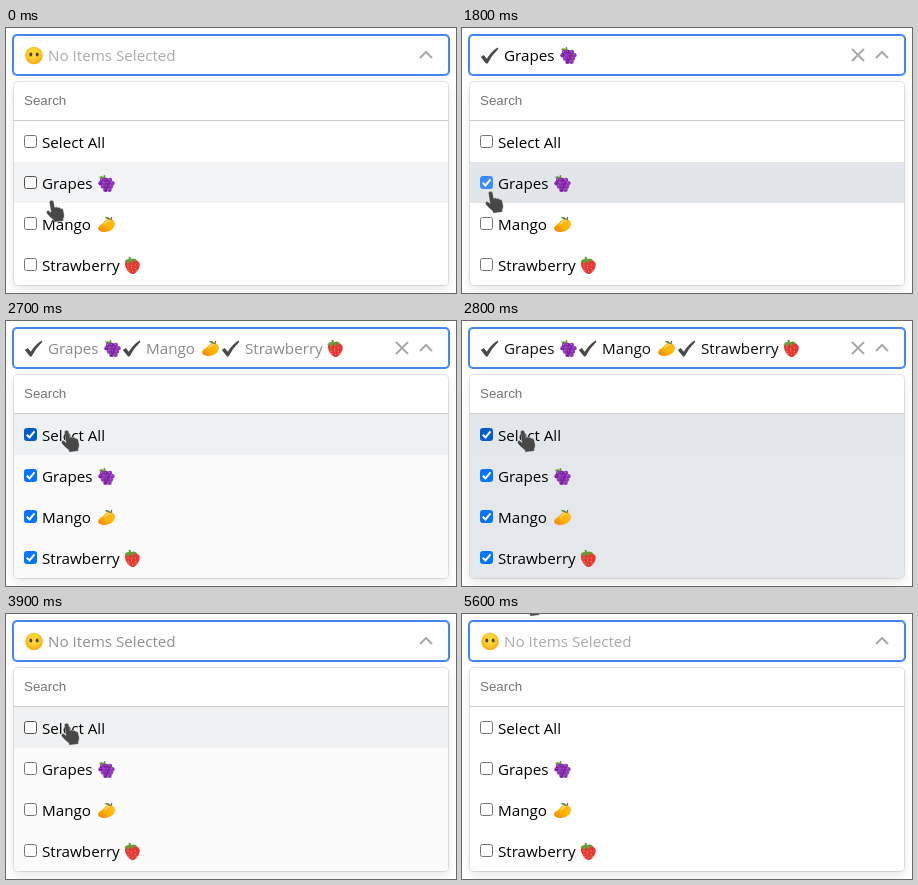
Write an HTML page that moves like this. It is 450x265 px and loops after 5900 ms.

```html
<!DOCTYPE html>
<html lang="en">
<head>
<meta charset="utf-8">
<title>Multi select</title>
<style>
  html, body { margin: 0; width: 100%; height: 100%; overflow: hidden; background: #fff; }
  .box { position: absolute; box-sizing: border-box; border-radius: 4px; background: #fff; }
  #head { left: 7px; top: 7px; width: 436px; height: 40px; border: 1px solid #4285f4; box-shadow: 0 0 0 1px #4285f4; }
  #panel { left: 8px; top: 54px; width: 434px; height: 203px; box-shadow: 0 0 0 1px rgba(0,0,0,.1), 0 4px 11px rgba(0,0,0,.1); }
  svg { position: absolute; left: 0; top: 0; }
  text { font: 15.2px "Open Sans", "Noto Sans", sans-serif; }
  .search { font: 13.333px "Liberation Sans", Arial, sans-serif; fill: #757575; }
  .icon { fill: none; stroke: #aaa; stroke-width: 2; }
</style>
</head>
<body>
<div class="box" id="head"></div>
<div class="box" id="panel"></div>
<svg id="stage" width="450" height="265" viewBox="0 0 450 265">
  <defs>
    <clipPath id="clip"><rect x="8" y="54" width="434" height="203" rx="4"/></clipPath>
    <radialGradient id="skin" cy=".4"><stop offset=".5" stop-color="#fdd835"/><stop offset="1" stop-color="#f5b31c"/></radialGradient>
    <linearGradient id="peel" x1="1" y1="0" x2="0" y2="1"><stop offset="0" stop-color="#fbc02d"/><stop offset=".55" stop-color="#ffb300"/><stop offset="1" stop-color="#ef7d1a"/></linearGradient>
    <g id="face">
      <circle cx="9" cy="9" r="8.8" fill="url(#skin)"/>
      <ellipse cx="5.8" cy="8" rx="1.5" ry="2" fill="#5d4037"/>
      <ellipse cx="12.2" cy="8" rx="1.5" ry="2" fill="#5d4037"/>
    </g>
    <g id="tick"><path d="M.8 10.6L3.8 8.4L6.8 12.2Q11 5.2 17.6 1L18.4 2.2Q12 8.4 7.6 17H6Z" fill="#4a4a4a"/></g>
    <g id="Grapes"></g>
    <g id="Mango">
      <path d="M13.2 3.6C17.6 4.8 18.8 9 16 12.4C12.8 16.3 6 17.6 2 15.2C-.6 13.4.8 10.6 3.6 9C7 7 8.2 2.6 13.2 3.6Z" fill="url(#peel)"/>
      <path d="M7.4 8.2Q9.4 5.3 12 5" fill="none" stroke="#ffe082" stroke-width="1.1" stroke-linecap="round"/>
      <path d="M13.4 4.2Q9.4 4.6 7.2 1.8Q11.4.3 13.4 4.2Z" fill="#558b2f"/>
      <path d="M13.2 4.4L14.4 1.6" stroke="#795548" stroke-width="1.2"/>
    </g>
    <g id="Strawberry">
      <path d="M3 4.8C6 2.6 14 2.4 16.2 6C18.2 9.8 14.4 15.8 10.8 17.4C8.2 18.2 4.8 15.2 3 11.4C1.8 8.8 1.4 6.2 3 4.8Z" fill="#e53935"/>
      <g id="seeds" fill="#ffcc80"></g>
      <path d="M1.4 5.6Q2.6 2.4 6 2.6L5.4.4L7.4.2L8.2 2.4Q12.2 1.2 14.6 4.2Q12 4.4 10.2 3.8L10.4 6.8Q8.4 6 7.4 4.4Q6.2 7 4 7.6L4.2 5Z" fill="#689f38"/>
    </g>
  </defs>
  <g id="rows" clip-path="url(#clip)"></g>
  <text class="search" x="18" y="77">Search</text>
  <rect x="8" y="92" width="434" height="1" fill="#ccc"/>
  <g id="value"></g>
  <path class="icon" d="M414 30l6-6l6 6"/>
  <path class="icon" id="clear" d="M390 21l12 12M402 21l-12 12"/>
  <path id="hand" fill="#484848" stroke="#fff" stroke-opacity=".55" stroke-width=".7"
    d="M3.4 2.6C3.2-.2 7.4-.4 7.8 2.2L8.8 7.4Q10.4 6.2 11.8 7.6Q13.6 6.8 14.6 8.4Q16.8 8 17.3 10.2L18.2 14.2Q18.6 17 17.3 18.8L17.6 21L8.2 22.2L7.6 20Q4 17.6 1 13.8C-.6 11.6 1.4 9.8 3.2 11L5 12.4Z"/>
</svg>
<script>
const LOOP = 5900, STEP = 100, FADE = 200;
const ROW_TOP = 93, ROW_H = 41;
const WHITE = [255, 255, 255], HOVER = [241, 243, 245], PICKED = [226, 230, 234];
const GRAY = [170, 170, 170], BLACK = [0, 0, 0];
const PICK = 660, DROP = 1960, ALL = 2670, NONE = 3790;

const $ = id => document.getElementById(id);
const use = (id, x, y) => `<use href="#${id}" x="${x}" y="${y}"/>`;
const label = (s, x, y) => `<text x="${x}" y="${y}">${s}</text>`;

// name, distance from label to emoji, label x in the header
const fruits = [["Grapes", 55, 42], ["Mango", 55.5, 140], ["Strawberry", 81, 239]];

// start colour, then [time, next colour]
const fruitFade = [WHITE, [ALL, PICKED], [NONE, WHITE]];
const rowFades = [
  [WHITE, [2410, HOVER], [ALL, PICKED], [NONE, HOVER], [5055, WHITE]],
  [HOVER, [PICK, PICKED], [DROP, HOVER], [2410, WHITE], [ALL, PICKED], [NONE, WHITE]],
  fruitFade, fruitFade
];
const textFade = [GRAY, [PICK, BLACK], [DROP, GRAY], [ALL, BLACK], [NONE, GRAY]];

// time, x, y
const path = [[0, 40, 172], [400, 23, 163], [2200, 23, 163], [2600, 55, 109], [4900, 55, 109], [5600, 60, -20]];
// mouse button held: row, from, to
const presses = [[1, 600, PICK], [1, 1800, DROP], [0, 2600, ALL], [0, 3700, NONE]];

function buildEmoji() {
  let berries = '<path d="M9 5Q7 3 7.4 .6" fill="none" stroke="#6d8b35" stroke-width="1.5"/>' +
    '<path d="M8.6 4.2Q4.2 5.4 1.8 2.4Q6.2.4 8.6 4.2Z" fill="#689f38"/>';
  for (let r = 0; r < 4; r++) {
    const n = [3, 4, 3, 2][r];
    for (let i = 0; i < n; i++) {
      const x = 9 + r * .5 + (i - (n - 1) / 2) * 3.9, y = 5.6 + r * 3.2;
      berries += `<circle cx="${x}" cy="${y}" r="2.3" fill="${(i + r) % 2 ? "#7b1fa2" : "#8e35b5"}"/>` +
        `<circle cx="${x - .6}" cy="${y - .7}" r=".6" fill="#b46bd0"/>`;
    }
  }
  $("Grapes").innerHTML = berries;
  let seeds = "";
  for (let i = 0; i < 9; i++)
    seeds += `<circle cx="${5 + i % 3 * 3.6 + (i > 5 ? 1 : 0)}" cy="${8.4 + Math.floor(i / 3) * 2.8 + i % 2 * .8}" r=".5"/>`;
  $("seeds").innerHTML = seeds;
}

function buildList() {
  let html = "";
  for (let i = 0; i < 4; i++) {
    const y = ROW_TOP + i * ROW_H, f = fruits[i - 1];
    html += `<rect class="row" x="8" y="${y}" width="434" height="${ROW_H}"/>` +
      `<rect class="check" x="18.5" y="${y + 14.5}" width="12" height="12" rx="2"/>` +
      `<path class="mark" d="M20.8 ${y + 20.7}l2.7 2.7l5-6" fill="none" stroke="#fff" stroke-width="2"/>` +
      label(f ? f[0] : "Select All", 36, y + 27) +
      (f ? use(f[0], 36 + f[1], y + 12.5) : "");
  }
  $("rows").innerHTML = html;
  $("value").innerHTML = `<g id="empty">${use("face", 19, 18.5)}${label("No Items Selected", 42, 33)}</g>` +
    fruits.map(([name, gap, x]) => `<g class="chip">${use("tick", x - 24, 18.5)}${label(name, x, 33)}${use(name, x + gap, 18.5)}</g>`).join("");
}

// cubic-bezier(.25, .1, .25, 1)
function ease(p) {
  if (p <= 0) return 0;
  if (p >= 1) return 1;
  const bez = (a, b, u) => 3 * a * u * (1 - u) ** 2 + 3 * b * u * u * (1 - u) + u ** 3;
  let lo = 0, hi = 1;
  for (let i = 0; i < 20; i++) {
    const m = (lo + hi) / 2;
    if (bez(.25, .25, m) < p) lo = m; else hi = m;
  }
  return bez(.1, 1, lo);
}

function colorAt([first, ...changes], t) {
  const c = changes.reduce((from, [at, to]) => {
    const k = ease((t - at) / FADE);
    return from.map((v, i) => v + (to[i] - v) * k);
  }, first);
  return `rgb(${c.map(Math.round)})`;
}

function handAt(t) {
  const i = path.findIndex(p => p[0] > t);
  if (i < 0) return path[path.length - 1].slice(1);
  const [t0, x0, y0] = path[i - 1], [t1, x1, y1] = path[i];
  const p = (t - t0) / (t1 - t0), k = p * p * (3 - 2 * p);
  return [x0 + (x1 - x0) * k, y0 + (y1 - y0) * k];
}

buildEmoji();
buildList();
const all = s => [...document.querySelectorAll(s)];
const rows = all(".row"), checks = all(".check"), marks = all(".mark"), chips = all(".chip"), words = all("#value text");
const show = (el, on) => { el.style.display = on ? "" : "none"; };

function render(t) {
  const every = t >= ALL && t < NONE, one = t >= PICK && t < DROP;
  const [x, y] = handAt(t);
  const over = Math.floor((y - ROW_TOP) / ROW_H);

  rows.forEach((el, i) => {
    const on = every || (one && i === 1);
    const held = presses.some(([r, a, b]) => r === i && t >= a && t < b);
    const mood = held ? 2 : over === i ? 1 : 0;
    const blue = ["#0075ff", "#005cc8", "#378cff"][mood];
    el.setAttribute("fill", colorAt(rowFades[i], t));
    checks[i].setAttribute("fill", on ? blue : "#fff");
    checks[i].setAttribute("stroke", on ? blue : ["#767676", "#4f4f4f", "#8d8d8d"][mood]);
    show(marks[i], on);
  });

  const ink = colorAt(textFade, t);
  words.forEach(el => el.setAttribute("fill", ink));
  show($("empty"), !every && !one);
  chips.forEach((el, i) => show(el, every || (one && i === 0)));
  show($("clear"), every || one);
  $("hand").setAttribute("transform", `translate(${x.toFixed(2)} ${y.toFixed(2)})`);
}

const start = performance.now();
function tick() {
  const t = (performance.now() - start) % LOOP;
  render(Math.floor(t / STEP) * STEP);
  requestAnimationFrame(tick);
}
tick();
</script>
</body>
</html>
```
